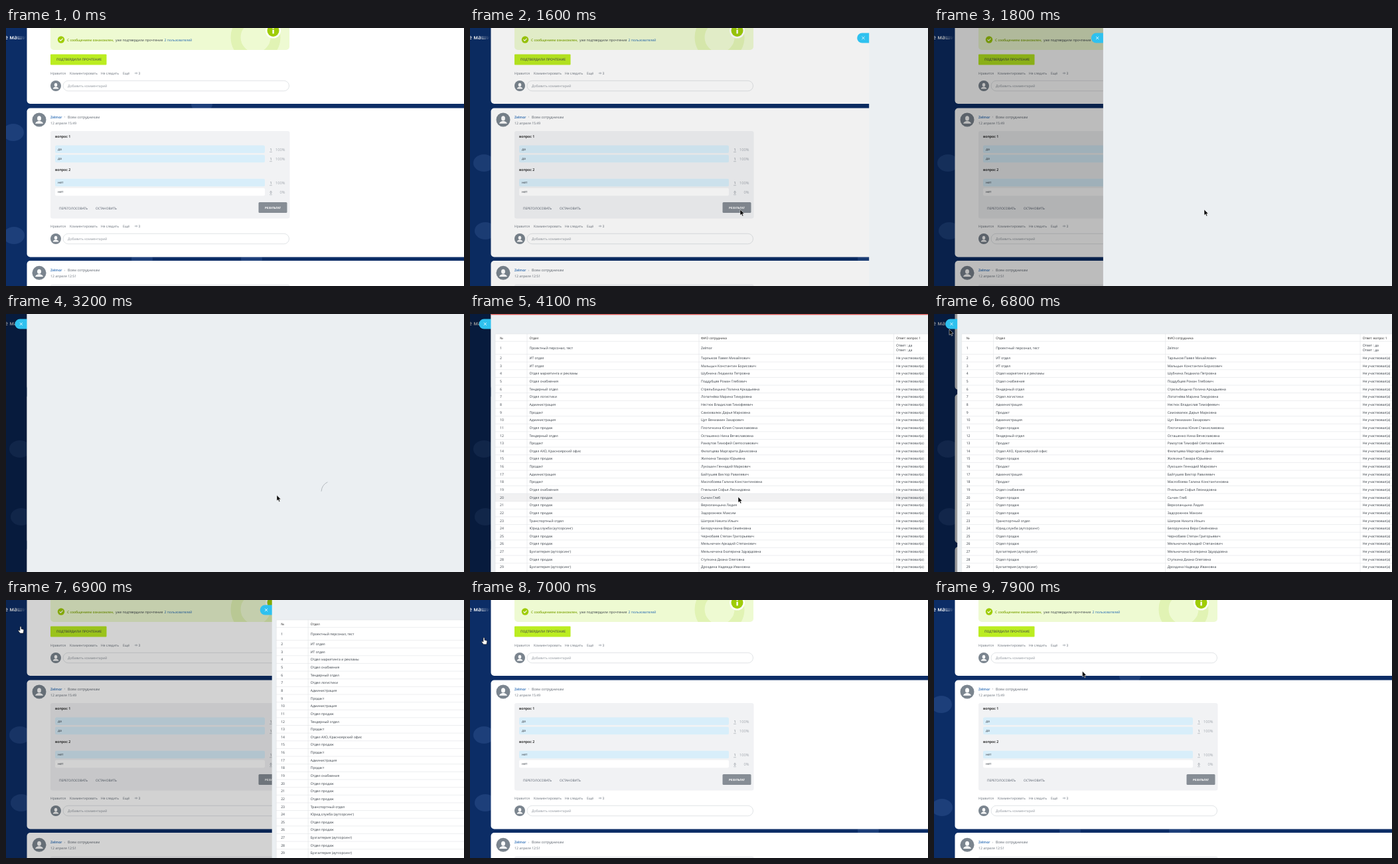
Write an HTML page that moves like this. It is 690x388 px and loops after 8000 ms.

```html
<!DOCTYPE html>
<html lang="ru">
<head>
<meta charset="utf-8">
<style>
html, body { margin: 0; width: 690px; height: 388px; overflow: hidden; background: #0c2d66; }
svg { display: block; }
text { font: 5.1px "Open Sans", "Noto Sans", sans-serif; fill: #333a42; text-rendering: geometricPrecision; white-space: pre; }
</style>
</head>
<body>
<svg id="stage" width="690" height="388" viewBox="0 0 690 388"></svg>
<script>
const text = (x, y, s, style = '') => `<text x="${x}" y="${y}" style="${style}">${s}</text>`;
const rect = (x, y, w, h, fill, r = 0, more = '') =>
  `<rect x="${x}" y="${y}" width="${w}" height="${h}" rx="${r}" fill="${fill}" ${more}/>`;
const ellipse = (x, y, rx, ry, fill) => `<ellipse cx="${x}" cy="${y}" rx="${rx}" ry="${ry}" fill="${fill}"/>`;
const circle = (x, y, r, fill) => ellipse(x, y, r, r, fill);
const line = (d, color, width) =>
  `<path d="${d}" fill="none" stroke="${color}" stroke-width="${width}" stroke-linecap="round"/>`;

// Feed

const avatar = (x, y, r) => circle(x, y, r, '#7b858f') +
  ellipse(x, y - r * .2, r * .28, r * .34, '#fff') +
  `<path transform="translate(${x} ${y}) scale(${r})" d="M-.56 .55Q-.52 .28-.14 .18H.14Q.52 .28 .56 .55Z" fill="#fff"/>`;

const footer = y => {
  const gray = 'fill:#656d77;font-size:5px';
  return text(67, y, 'Нравится', gray) + text(96, y, 'Комментировать', gray) +
    text(143, y, 'Не следить', gray) + text(176, y, 'Ещё', gray) +
    line(`M194 ${y - 2}q2.2-2.6 4.4 0q-2.2 2.4-4.4 0`, '#a5abb2', .5) + circle(196.2, y - 2, .8, '#a5abb2') +
    text(199.6, y, '3', gray) + avatar(75, y + 17, 8) +
    rect(86, y + 9.3, 340.5, 15.4, '#fff', 7.7, 'stroke="#d5d8dc" stroke-width=".7"') +
    text(93, y + 19, 'Добавить комментарий', 'fill:#8d939b');
};

const author = (y, date) => avatar(50, y + 3, 10.5) +
  text(67, y + .5, 'Zelmor', 'fill:#1c62b0;font-weight:600') + text(87.5, y + .2, '›', 'fill:#8b929a') +
  text(93, y + .5, 'Всем сотрудникам', 'fill:#5b636d;font-size:5.4px') +
  text(67, y + 9.5, date, 'fill:#666e78');

const answer = (y, label, count, fill) => rect(74, y, 316, 11.5, fill, 2) +
  text(78, y + 7.6, label) +
  text(399, y + 8.6, count, 'fill:#6a727c;font-size:5.4px;text-anchor:middle') +
  line(`M397.5 ${y + 10}h3`, '#8b929a', .5) +
  text(420.5, y + 8.6, count * 100 + '%', 'fill:#a3a9b0;font-size:5.7px;text-anchor:end');

const wallpaper = (id, spots) => `<g id="${id}">` +
  spots.map(([x, y]) => ellipse(x, y, 16, 13, '#1d3f7a')).join('') + '</g>';

const bold = 'font-weight:600;font-size:5.3px;fill:#111';
const blue = '#d8eefa';
const feed =
  wallpaper('wallA', [[11, 157], [12, 312], [205, 347], [370, 347], [295, 114]]) +
  wallpaper('wallB', [[21, 203], [23, 305], [600, 347]]) +
  text(-2, 17, 'е маши', 'font-size:8.6px;font-weight:600;fill:url(#fade)') +
  rect(31.5, -20, 700, 134, '#fff', 5) + rect(31.5, 120.5, 700, 224, '#fff', 5) + rect(31.5, 350, 700, 80, '#fff', 5) +
  '<g clip-path="url(#notice)">' + rect(67, -20, 360, 53, '#eefad2') +
  `<circle cx="376" cy="14" r="30" fill="none" stroke="#e1f3b4" stroke-width="15"/></g>` +
  circle(402.5, 4, 11.5, '#fff') + circle(402.5, 4, 9, '#9fcc08') +
  rect(401.4, 2.6, 2.4, 6, '#fff', .5) + circle(402.6, -.2, 1.4, '#fff') +
  circle(83, 17.5, 5.2, '#9fcc08') + line('M80.8 17.6l1.6 1.6 2.9-3.1', '#fff', 1.1) +
  text(92, 19.6, 'С сообщением ознакомлен,', 'fill:#7da405;font-weight:600;font-size:5px') +
  text(165, 19.6, 'уже подтвердили прочтение') + text(238.5, 19.6, '2 пользователей', 'fill:#1c62b0') +
  rect(67, 39.5, 84.5, 16, '#bbed21', 1) +
  text(76, 49.4, 'ПОДТВЕРДИЛИ ПРОЧТЕНИЕ', 'font-size:4.9px;fill:#535c45;font-weight:600') +
  footer(70) + author(135, '12 апреля 15:49') +
  rect(67, 155, 360.5, 131.5, '#f1f2f4', 3) +
  text(74, 165, 'вопрос 1', bold) + text(74, 215.3, 'вопрос 2', bold) +
  answer(176.5, 'да', 1, blue) + answer(190.7, 'да', 1, blue) +
  answer(226.7, 'нет', 1, blue) + answer(240.7, 'нет', 0, '#fff') +
  text(80, 273.2, 'ПЕРЕГОЛОСОВАТЬ', 'font-size:4.8px;fill:#535c69') +
  text(135, 273.2, 'ОСТАНОВИТЬ', 'font-size:4.8px;fill:#535c69') +
  rect(380.5, 262, 43, 16, '#868d95', 1.5) +
  text(402, 271.7, 'РЕЗУЛЬТАТ', 'font-size:4.4px;font-weight:700;fill:#fff;text-anchor:middle') +
  footer(300) + author(365.3, '12 апреля 12:51') + rect(67, 385.3, 360.5, 10, '#f1f2f4', 3);

// Results table

const sales = 'Отдел продаж', it = 'ИТ отдел', supply = 'Отдел снабжения', admin = 'Администрация',
  product = 'Продакт', tender = 'Тендерный отдел', books = 'Бухгалтерия (аутсорсинг)';
const staff = [
  [it, 'Тарлыков Павел Михайлович'],
  [it, 'Мальцын Константин Борисович'],
  ['Отдел маркетинга и рекламы', 'Шубнина Людмила Петровна'],
  [supply, 'Поддубцев Роман Глебович'],
  [tender, 'Стрельбицына Полина Аркадьевна'],
  ['Отдел логистики', 'Лопатнёва Марина Тимуровна'],
  [admin, 'Нестюк Владислав Тимофеевич'],
  [product, 'Самохвалюк Дарья Марковна'],
  [admin, 'Цуп Вениамин Захарович'],
  [sales, 'Плотичкина Юлия Станиславовна'],
  [tender, 'Осташенко Нина Вячеславовна'],
  [product, 'Рамзутов Тимофей Святославович'],
  ['Отдел АХО, Красноярский офис', 'Филатцева Маргарита Денисовна'],
  [sales, 'Жилкина Тамара Юрьевна'],
  [product, 'Лукошин Геннадий Маркович'],
  [admin, 'Байтушев Виктор Равилевич'],
  [product, 'Маслобоева Галина Константиновна'],
  [supply, 'Пчельная Софья Леонидовна'],
  [sales, 'Сычин Глеб'],
  [sales, 'Верхоланцына Лидия'],
  [sales, 'Задорожнюк Максим'],
  ['Транспортный отдел', 'Шатров Никита Ильич'],
  ['Юрид.служба (аутсорсинг)', 'Белоручкина Вера Семёновна'],
  [sales, 'Чернобаев Степан Григорьевич'],
  [sales, 'Мельничин Аркадий Степанович'],
  [books, 'Мельничина Екатерина Эдуардовна'],
  [sales, 'Ступкина Диана Олеговна'],
  [books, 'Дроздина Надежда Ивановна'],
];
const columns = [45, 89.5, 348, 642];
const rowTop = 60.5, rowStep = 11.64;
const row = (y, cells, style) => cells.map((s, i) => text(columns[i], y, s, style)).join('');
const rule = d => line(d, '#e1e3e6', .6);
const table = rect(38, 30, 660, 360, '#fff') + rect(38, 0, 660, rowStep, '#f1f1f2', 0, 'id="hover"') +
  rule('M38 388V30H690M38 41.2H690M86 30V388M345 30V388M638.5 30V388') +
  row(37.6, ['№', 'Отдел', 'ФИО сотрудника', 'Ответ: вопрос 1'], 'font-size:4.8px;fill:#222') +
  row(53, [1, 'Проектный персонал, тест', 'Zelmor']) +
  text(642, 49.3, 'Ответ : да') + text(642, 56.4, 'Ответ : да') +
  staff.map(([unit, name], i) => {
    const y = rowTop + i * rowStep;
    return rule(`M38 ${y}H690`) + row(y + 7.6, [i + 2, unit, name, 'Не участвовал(а)']);
  }).join('');

const panel = '<path d="M0.5 7.5H-11a7.5 7.5 0 0 0 0 15H.5Z" transform="translate(32 0)" fill="#2fc1ef"/>' +
  line('M21 13.2l3.6 3.6m0-3.6l-3.6 3.6', '#fff', .8) + rect(31.5, 0, 700, 388, '#ebeff2') +
  '<path id="loader" fill="none" stroke="#b4b9be"/>' +
  `<g id="table">${table}</g>` + rect(31.5, 0, 660, 1.3, '#d9534f', 0, 'id="bar"');

const stage = document.getElementById('stage');
stage.innerHTML = `<defs>
  <linearGradient id="fade" gradientUnits="userSpaceOnUse" x1="14" x2="30" y1="0" y2="0">
    <stop stop-color="#fff"/><stop offset="1" stop-color="#fff" stop-opacity="0"/></linearGradient>
  <clipPath id="notice"><rect x="67" y="-20" width="360" height="53" rx="5"/></clipPath></defs>` +
  feed + rect(0, 0, 690, 388, '#000', 0, 'id="shade"') + `<g id="panel">${panel}</g>
  <g id="cursor"><path id="arrow" d="M0 0V8.6L2 6.8 3.4 9.9 4.8 9.3 3.5 6.3H6.1Z" fill="#000" stroke="#fff" stroke-width=".5"/>
  <path id="hand" d="M-1 5V.6Q-1-.4 0-.4T1 .6V3.2L4 4Q4.8 4.3 4.8 5.4L4 9.8H-.7L-3.4 6.2Q-3.4 4.6-2 5.2L-1 6Z"
    fill="#fff" stroke="#111" stroke-width=".6"/></g>`;

// Motion

const path = [[600, 424, 274], [900, 406, 273], [1600, 407, 273], [3200, 408, 272.5], [3600, 408, 272.5],
  [4100, 404, 275], [4600, 404, 275], [5300, 616, 150], [5800, 19, 17], [6400, 19, 17], [6600, 23, 23],
  [6800, 23, 23], [7000, 21, 57], [7300, 18, 64], [7600, 70, 78], [7900, 223.5, 107]];
const clamp = v => Math.max(0, Math.min(1, v));
const ease = v => v * v * (3 - 2 * v);
const byId = id => document.getElementById(id);
const show = (id, on) => byId(id).setAttribute('display', on ? 'inline' : 'none');

function cursorAt(t) {
  const i = path.findIndex(p => p[0] > t);
  if (i < 1) return path[i < 0 ? path.length - 1 : 0].slice(1);
  const [a, b] = [path[i - 1], path[i]];
  const k = ease((t - a[0]) / (b[0] - a[0]));
  return [a[1] + (b[1] - a[1]) * k, a[2] + (b[2] - a[2]) * k];
}

function loaderArc(t) {
  const u = (t + 32) % 1500 / 750;
  const grow = ease(clamp(u)), chase = ease(clamp(u - 1));
  const start = .18 * t - 55 + 100 * grow + 255 * chase;
  const end = start + 1 + 255 * grow * (1 - chase);
  const point = a => `${492 + 17 * Math.cos(a * Math.PI / 180)} ${268 + 17 * Math.sin(a * Math.PI / 180)}`;
  return `M${point(start)}A17 17 0 ${+(end - start > 180)} 1 ${point(end)}`;
}

function draw(now) {
  const t = now % 8000;
  const open = t < 6800 ? clamp((t - 1550) / 380) : clamp(1 - (t - 6800) / 180);
  byId('panel').setAttribute('transform', `translate(${(1 - open) * 658} 0)`);
  show('panel', open > 0);
  byId('shade').setAttribute('opacity', .4 * open);

  const loading = t > 2100 && t < 3300;
  show('loader', loading);
  if (loading) byId('loader').setAttribute('d', loaderArc(t));
  show('table', t >= 3300);
  show('bar', t >= 3600 && t < 5300);

  const away = t >= 1600 && t < 7300;
  show('wallA', !away);
  show('wallB', away);

  const [x, y] = cursorAt(t);
  const index = Math.floor((y - rowTop) / rowStep);
  show('hover', x > 38 && index >= 0);
  byId('hover').setAttribute('y', rowTop + index * rowStep);
  const hand = t < 1600 && x < 424 || t >= 5800 && t < 6500 || t >= 6900 && t < 7300;
  show('cursor', t >= 600);
  show('hand', hand);
  show('arrow', !hand);
  byId('cursor').setAttribute('transform', `translate(${x} ${y})`);
  requestAnimationFrame(draw);
}
requestAnimationFrame(draw);
</script>
</body>
</html>
```
